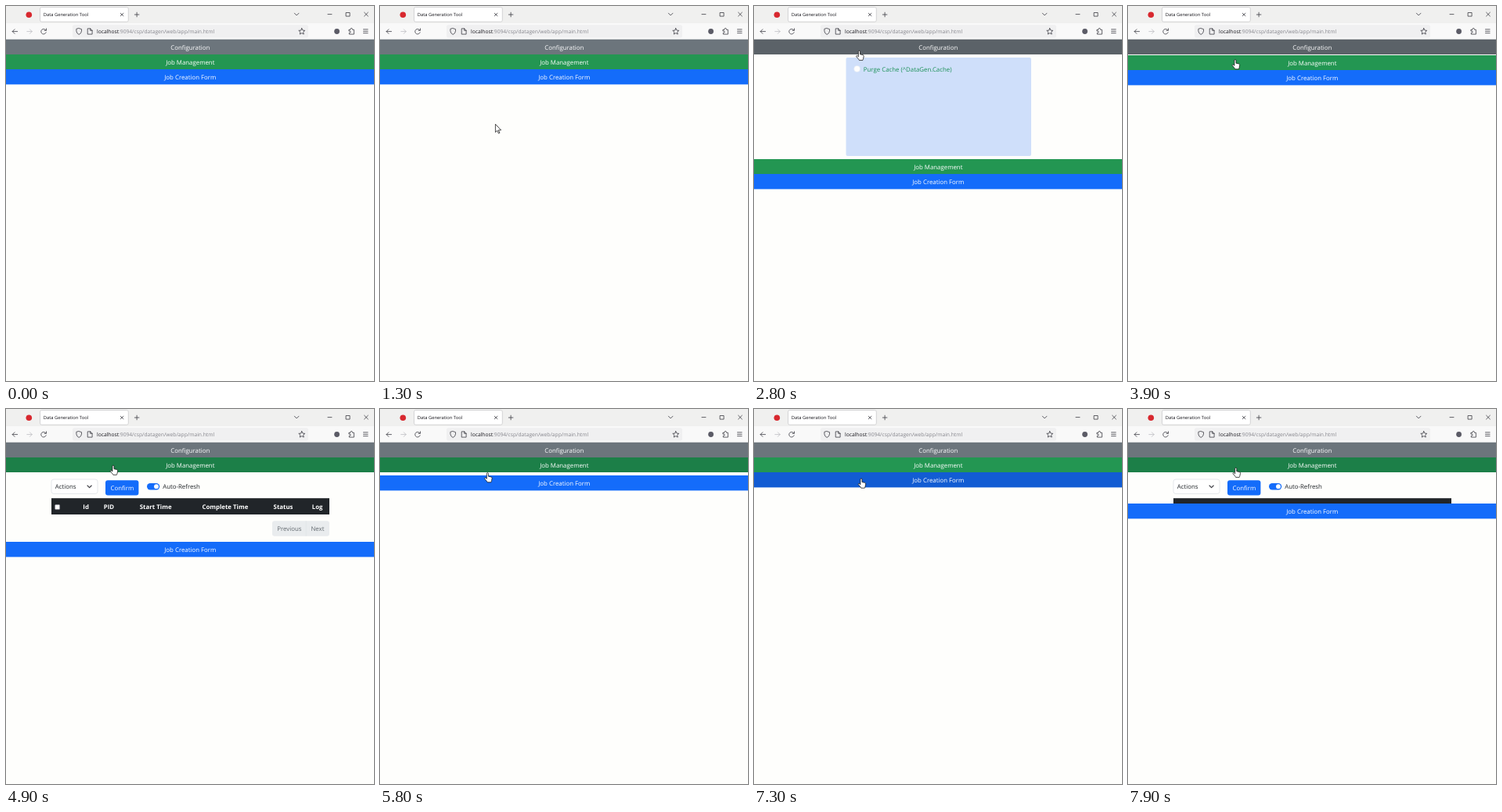
Animation of 470x480 px, one loop 8 s. Source, as an HTML page:

```html
<!DOCTYPE html>
<html lang="en">
<head>
<meta charset="utf-8">
<title>Data Generation Tool</title>
<style>
  html, body { margin: 0; width: 100%; height: 100%; overflow: hidden; background: #fefefc; }
  svg { display: block; }
  text { font: 7.85px "Open Sans", "Noto Sans", sans-serif; white-space: pre; text-rendering: geometricPrecision; }
  .bar text { fill: #fff; text-anchor: middle; }
  .ico { fill: none; stroke: #3c3c43; stroke-width: .8; stroke-linecap: round; stroke-linejoin: round; }
  .head text { font-weight: 700; fill: #fff; }
  .form text { fill: #f4f5f6; }
  .form .hint { fill: #30363b; }
</style>
</head>
<body>
<svg id="stage" width="470" height="480" viewBox="0 0 470 480">
  <rect width="470" height="480" fill="#fefefc"/>

  <!-- page -->
  <g class="bar">
    <rect id="cfgBar" y="42" width="470" height="20"/>
    <text class="mid" y="55.8">Configuration</text>
  </g>
  <svg id="cfgBody" y="62" width="470" height="0">
    <rect x="117.5" y="4" width="236.5" height="126" rx="2" fill="#cfdffa"/>
    <circle cx="131.6" cy="18.4" r="4" fill="#fefefe" stroke="#dbe3ee" stroke-width=".5"/>
    <text x="139.8" y="22" fill="#1c9158">Purge Cache (^DataGen.Cache)</text>
  </svg>

  <g id="jobs">
    <g class="bar">
      <rect id="jobBar" y="62" width="470" height="19"/>
      <text class="mid" y="75">Job Management</text>
    </g>
    <svg id="jobBody" y="81" width="470" height="0">
      <g transform="translate(0 -81)">
        <rect x="58" y="90" width="59" height="18.5" rx="3" fill="#fff" stroke="#dfe2e6" stroke-width=".8"/>
        <text x="62.8" y="102.3" fill="#212529">Actions</text>
        <path class="ico" d="M104 98l2.6 2.6 2.6-2.6" style="stroke-width:1.1"/>
        <rect x="127" y="91.2" width="42.4" height="19.2" rx="3" fill="#146cfa"/>
        <text x="148.4" y="104" fill="#fff" text-anchor="middle">Confirm</text>
        <rect x="180" y="95" width="16.2" height="8.4" rx="4.2" fill="#146cfa"/>
        <circle cx="192" cy="99.2" r="2.9" fill="#fff"/>
        <text x="200.2" y="102.3" fill="#212529">Auto-Refresh</text>
        <rect x="58" y="114.2" width="355" height="20.8" fill="#212529"/>
        <rect x="62.6" y="122.6" width="6" height="6" rx="1" fill="#fff" stroke="#8f8f9d" stroke-width=".7"/>
        <g class="head">
          <text x="98.3" y="127.9">Id</text><text x="124.8" y="127.9">PID</text>
          <text x="170.8" y="127.9">Start Time</text><text x="250.4" y="127.9">Complete Time</text>
          <text x="341.6" y="127.9">Status</text><text x="390.8" y="127.9">Log</text>
        </g>
        <rect x="340" y="143.2" width="73" height="19.6" rx="3" fill="#e9ecee"/>
        <path d="M383.2 143.2v19.6" stroke="#dee2e6" stroke-width=".6"/>
        <text x="346.3" y="156.2" fill="#62696f">Previous</text>
        <text x="389.4" y="156.2" fill="#62696f">Next</text>
      </g>
    </svg>

    <g id="create">
      <g class="bar">
        <rect id="newBar" y="81" width="470" height="19.4"/>
        <text class="mid" y="94.3">Job Creation Form</text>
      </g>
      <svg id="newBody" y="100.4" width="470" height="0"><g id="form" class="form"></g></svg>
    </g>
  </g>

  <!-- scrollbar -->
  <g id="scroll">
    <rect x="463" y="42" width="7" height="438" fill="#f0f0f0"/>
    <rect id="thumb" x="463.4" y="51" width="6.2" fill="#cdcdcd"/>
    <path class="ico" d="M464.8 48l1.8-1.9 1.8 1.9M464.8 475l1.8 1.9 1.8-1.9" style="stroke:#606060"/>
  </g>

  <!-- browser window -->
  <rect width="470" height="22" fill="#f0f0ef"/>
  <rect y="22" width="470" height="20.7" fill="#f9f9f9"/>
  <rect x="43.5" y="1.6" width="112.8" height="18.6" rx="2" fill="#fff" stroke="#c9c9cc" stroke-width=".8"/>
  <circle cx="29.3" cy="11.2" r="3.8" fill="#d8282f"/>
  <text x="47.8" y="13.2" fill="#15141a" style="font-size:5.8px">Data Generation Tool</text>
  <rect x="85" y="24.3" width="301" height="16.2" rx="2" fill="#f0f0f1"/>
  <text x="116" y="35" fill="#85858c" style="font-size:6.7px"><tspan fill="#15141a">localhost</tspan>:9094/csp/datagen/web/app/main.html</text>
  <g class="ico">
    <path d="M146.3 9.2l3.6 3.6m0-3.6l-3.6 3.6M164.3 11h5.6m-2.8-2.8v5.6"/>
    <path d="M368.4 9.2l2.8 2.8 2.8-2.8M411 10.6h5M434.5 8.5h4.6v4.6h-4.6zM457.6 8.2l4.8 4.8m0-4.8l-4.8 4.8"/>
    <path d="M14.6 32.6H8.2m2.8-2.8l-2.8 2.8 2.8 2.8"/>
    <path d="M26.8 32.6h6.4m-2.8-2.8l2.8 2.8-2.8 2.8" stroke="#bdbdc2" style="stroke:#bdbdc2"/>
    <path d="M50.9 31a3.3 3.3 0 1 0 .3 2.8M51.5 28.9v2.4h-2.4"/>
    <path d="M93.2 28.6l3.3 1.1v2.4q-.2 3-3.3 4.4-3.1-1.4-3.3-4.4v-2.4z"/>
    <path d="M104.6 28.9h3.2l2.3 2.3v4.9h-5.5zM107.6 29v2.4h2.4"/>
    <path d="M377.8 28.5l1.2 2.6 2.8.3-2.1 1.9.6 2.8-2.5-1.4-2.5 1.4.6-2.8-2.1-1.9 2.8-.3z"/>
    <path d="M438.3 30.3h1.7v-.7a1.2 1.2 0 0 1 2.4 0v.7h2v5.8h-6.1v-1.8h.8a1.1 1.1 0 0 0 0-2.2h-.8z"/>
    <path d="M456.5 29.9h5.6m-5.6 2.4h5.6m-5.6 2.4h5.6"/>
  </g>
  <circle cx="422.6" cy="32.5" r="3.4" fill="#5b5b66"/>

  <!-- pointer -->
  <g id="pointer" fill="#fff" stroke="#111" stroke-width=".75" stroke-linejoin="round">
    <path id="arrow" d="M0 0v10.4l2.4-2.2 1.6 3.7 1.5-.7-1.6-3.5h3.3z"/>
    <path id="hand" d="M-1.1 1a1 1 0 0 1 2.1 0v3.5l3.6.8q1.2.4 1.1 1.7l-.6 3q-.2 1-.7 2.1h-4.6q-.4-1-1.5-2.2l-1.9-2.2q-.5-.9.1-1.3.7-.4 1.4.3l1 .9z"/>
  </g>
</svg>

<script>
const LOOP = 8000, STEP = 100, FADE = 150, SLIDE = 350;
const $ = id => document.getElementById(id);
const clamp = v => Math.max(0, Math.min(1, v));

// --- form markup ---
const text = (x, y, s, cls = '') => `<text x="${x}" y="${y}" class="${cls}">${s}</text>`;
const box = (y, hint, fill = '#6c757c', x = 77.8) =>
  `<rect x="71.5" y="${y}" width="319.3" height="18.8" rx="3" fill="${fill}" stroke="#b4bac0" stroke-width=".8"/>` +
  text(x, y + 13, hint, 'hint');
const toggle = (y, s) =>
  `<rect x="71.6" y="${y - 4.2}" width="16.2" height="8.4" rx="4.2" fill="#fff"/>` +
  `<circle cx="75.8" cy="${y}" r="2.8" fill="#bfbfbf"/>` + text(92, y + 3.4, s + ' Range');
const field = (y, s) => text(71.6, y, s) + box(y + 6.9, 'optional');

$('form').innerHTML =
  '<rect x="57" y="108.6" width="348" height="414" fill="#212529"/>' +
  '<rect x="365" y="121" width="25.8" height="15" rx="2" fill="none" stroke="#1c8a56" stroke-width=".8"/>' +
  '<text x="377.9" y="131.2" text-anchor="middle" style="fill:#1f965e;font-size:6.6px">Reset</text>' +
  text(71.6, 146, 'Number of Patient:') + box(153, '', '#fff') +
  toggle(186.3, 'Appointment') + field(211.3, 'Number of Appointment per Patient:') +
  toggle(251.6, 'Episode') + field(276.4, 'Number of Episode per Patient:') +
  toggle(316.6, 'Order') + text(71.6, 341.3, 'Order Category:') +
  box(348.2, 'Select Order Category (optional)', '#6c757c', 76.4) +
  '<path class="ico" d="M377.8 356.6l2.4 2.4 2.4-2.4" style="stroke:#30363b;stroke-width:1.1"/>' +
  field(385.1, 'Number of Order per Episode:') +
  toggle(425.5, 'Observation') + field(450.2, 'Number of Observation per Episode:');

// --- timing ---
function ease(u) {           // CSS "ease"
  let lo = 0, hi = 1, s;
  for (let i = 0; i < 24; i++) {
    s = (lo + hi) / 2;
    if (.75 * s * (1 - s) + s ** 3 < u) lo = s; else hi = s;
  }
  return .3 * s * (1 - s) ** 2 + 3 * s * s * (1 - s) + s ** 3;
}
const slide = (t, start) => t <= start ? 0 : t >= start + SLIDE ? 1 : ease((t - start) / SLIDE);
const opened = (t, size, open, close) => size * (slide(t, open) - slide(t, close));
const hover = (t, spans) => Math.max(...spans.map(([a, b]) =>
  clamp((t - a) / FADE) * (1 - clamp((t - b) / FADE))));

const path = [           // time, x, y
  [1200, 150, 170], [1800, 134.5, 57.3], [3800, 134.5, 57.3], [3900, 137, 68.7],
  [4400, 137, 71], [4900, 137, 72.2], [5700, 137, 72.2], [5800, 137.4, 81.7],
  [6300, 136.8, 92.5], [7200, 136.8, 92.5], [7700, 137.8, 75.3], [8000, 137.8, 75.3]
];
function pointerAt(t) {
  const i = path.findIndex(p => p[0] > t);
  const [a, b] = [path[i - 1], path[i]];
  const k = (t - a[0]) / (b[0] - a[0]);
  return [a[1] + (b[1] - a[1]) * k, a[2] + (b[2] - a[2]) * k];
}

const bars = [           // id, rest colour, hover colour, hover spans
  ['cfgBar', [108, 117, 124], [91, 98, 104], [[1650, 3900]]],
  ['jobBar', [35, 150, 82], [28, 127, 72], [[1500, 1600], [3900, 5800], [7450, 9000]]],
  ['newBar', [20, 108, 250], [18, 92, 211], [[1400, 1500], [5800, 7400]]]
];

const move = (id, x, y) => $(id).setAttribute('transform', `translate(${x} ${y})`);
const show = (id, on) => $(id).setAttribute('visibility', on ? 'visible' : 'hidden');
const tall = (id, h) => $(id).setAttribute('height', Math.max(0, h));

function draw(t) {
  const cfg = Math.round(opened(t, 134, 2136, 3588));
  const job = Math.round(opened(t, 89, 4515, 5543) + 89 * slide(t, 7806));
  const form = Math.round(opened(t, 430, 6370, 6880));
  tall('cfgBody', cfg);
  tall('jobBody', job);
  tall('newBody', form);
  move('jobs', 0, cfg);
  move('create', 0, job);

  const page = 58 + cfg + job + form, scrolls = page > 438;
  show('scroll', scrolls);
  tall('thumb', 421 * Math.min(1, 438 / page));
  move('form', scrolls ? 0 : 4, -100.4);
  document.querySelectorAll('.mid').forEach(e => e.setAttribute('x', scrolls ? 231.1 : 235.3));

  for (const [id, rest, over, spans] of bars) {
    const k = hover(t, spans);
    $(id).setAttribute('fill', `rgb(${rest.map((c, i) => Math.round(c + (over[i] - c) * k))})`);
  }

  const on = t >= path[0][0];
  $('pointer').setAttribute('display', on ? 'inline' : 'none');
  if (on) {
    const [x, y] = pointerAt(t), blank = y > 100;
    move('pointer', x, y);
    $('arrow').setAttribute('display', blank ? 'inline' : 'none');
    $('hand').setAttribute('display', blank ? 'none' : 'inline');
  }
}

function tick(now) {
  draw(Math.floor(((now + 16) % LOOP) / STEP) * STEP);
  requestAnimationFrame(tick);
}
draw(0);
requestAnimationFrame(tick);
</script>
</body>
</html>
```
